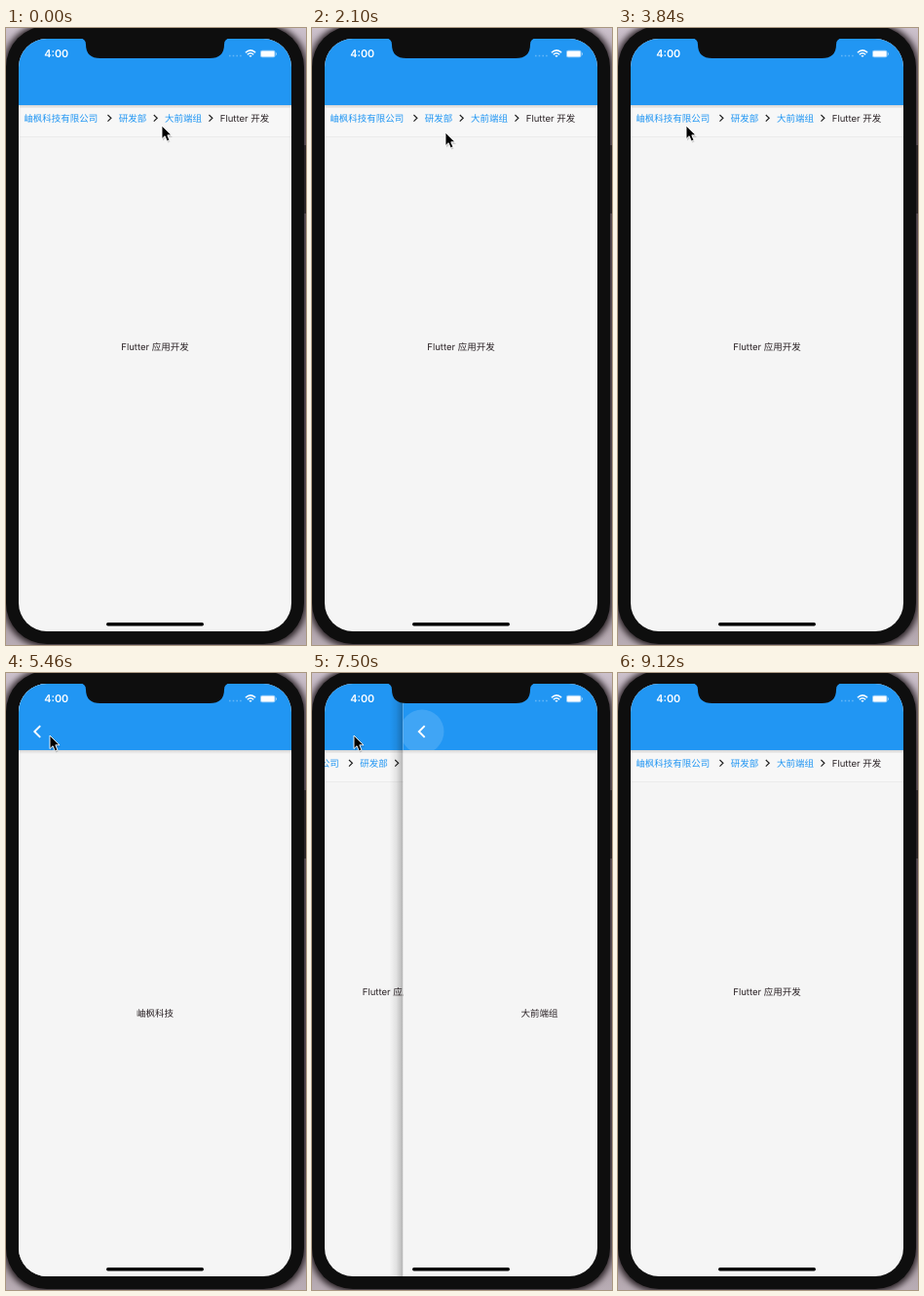
Write an HTML page that moves like this. It is 308 by 632 pixels and loops after 9.3 s.

```html
<!DOCTYPE html>
<html lang="zh-CN">
<head>
<meta charset="utf-8">
<title>Breadcrumb navigation</title>
<style>
  html, body { margin: 0; width: 308px; height: 632px; overflow: hidden; }
  svg { display: block; }
  text {
    font: 9.5px Inter, "Noto Sans CJK SC", "Noto Sans CJK", sans-serif;
    fill: #2a2225; text-rendering: geometricPrecision;
  }
  .link { fill: #2196f3; }
  .mid { text-anchor: middle; }
  .clock { font-size: 10.8px; font-weight: 600; fill: #fff; }
  .line { fill: none; stroke-linecap: square; }
  .halo { filter: blur(3px); }
</style>
</head>
<body>
<svg width="308" height="632" viewBox="0 0 308 632">
  <defs>
    <clipPath id="screen"><rect x="13" y="11" width="280" height="607" rx="29"/></clipPath>
    <clipPath id="bar"><rect x="13" y="11" width="280" height="68"/></clipPath>
    <linearGradient id="wall" x2="0" y2="1">
      <stop stop-color="#cdc2cd"/><stop offset=".12" stop-color="#93828c"/>
      <stop offset=".8" stop-color="#84747c"/><stop offset="1" stop-color="#b9adb5"/>
    </linearGradient>
    <linearGradient id="drop" x2="0" y2="1">
      <stop stop-color="#000" stop-opacity=".13"/><stop offset="1" stop-color="#000" stop-opacity="0"/>
    </linearGradient>
    <linearGradient id="edge">
      <stop stop-color="#000" stop-opacity="0"/><stop offset=".5" stop-color="#000" stop-opacity=".08"/>
      <stop offset="1" stop-color="#000" stop-opacity=".27"/>
    </linearGradient>
    <g id="sheet">
      <rect x="13" y="11" width="280" height="607" fill="#f5f5f5"/>
      <rect x="13" y="11" width="280" height="68" fill="#2196f3"/>
      <rect x="13" y="79" width="280" height="4" fill="url(#drop)"/>
    </g>
    <path id="next" class="line" d="M-1.6 -2.9L1.4 0L-1.6 2.9" stroke="#222" stroke-width="1.2"/>
  </defs>

  <rect width="308" height="632" fill="url(#wall)"/>
  <rect class="halo" x="-2" y="-4" width="310" height="638" rx="42" fill="#2a2226"/>
  <rect x="305" y="120" width="3" height="70" fill="#2a2427"/>
  <rect x="0" y="-2" width="306" height="633" rx="42" fill="#0e0e0e"/>

  <g clip-path="url(#screen)">
    <g id="home">
      <use href="#sheet"/>
      <rect x="13" y="82" width="280" height="29" fill="#f7f7f7"/>
      <path d="M13 111.500H293" stroke="#ebebeb"/>
      <text class="link" x="18.300" y="95.500">岫枫科技有限公司</text>
      <use href="#next" x="106.500" y="92.300"/>
      <text class="link" x="115.800" y="95.500">研发部</text>
      <use href="#next" x="153.800" y="92.300"/>
      <text class="link" x="163" y="95.500">大前端组</text>
      <use href="#next" x="210.500" y="92.300"/>
      <text x="219.800" y="95.500">Flutter 开发</text>
      <text class="mid" x="153" y="330">Flutter 应用开发</text>
    </g>
    <g id="page">
      <rect x="-1" y="11" width="14" height="607" fill="url(#edge)"/>
      <use href="#sheet"/>
      <g clip-path="url(#bar)"><circle id="ripple" cx="32.500" cy="60" fill="#fff"/></g>
      <path class="line" d="M34.500 54.800L29.300 60L34.500 65.200" stroke="#fff" stroke-width="1.900"/>
      <text id="label" class="mid" x="153" y="352"></text>
    </g>

    <text class="clock" x="39.300" y="30.300">4:00</text>
    <path d="M229 28.500H242" stroke="#fff" stroke-opacity=".3" stroke-width="1.300" stroke-dasharray="1.600 2.100"/>
    <g class="line" stroke="#fff" stroke-width="1.500" style="stroke-linecap: butt">
      <path d="M245.900 25.200Q251 20.600 256.100 25.200M247.800 27.200Q251 24.300 254.200 27.200"/>
      <path d="M249.300 28L251 30L252.700 28Z" fill="#fff" stroke="none"/>
    </g>
    <rect x="261" y="22.800" width="15.500" height="7.400" rx="2" fill="#fff" fill-opacity=".5"/>
    <rect x="262" y="23.800" width="13.500" height="5.400" rx="1.200" fill="#fff"/>
    <rect x="277" y="25.200" width="1" height="2.600" rx=".5" fill="#fff" fill-opacity=".5"/>
    <rect x="103" y="609" width="100" height="3.500" rx="1.700" fill="#000"/>
  </g>
  <path d="M76 10.500Q82 11 82 17Q82 31 97 31H209Q224 31 224 17Q224 11 230 10.500Z" fill="#0e0e0e"/>

  <g id="cursor">
    <path d="M1 2V15.500L4 12.800L6.200 17.500L8.500 16.500L6.500 12H11Z" fill="#000" opacity=".16"/>
    <path d="M0 0V13.600L3.100 10.700L5.300 15.900L7.900 14.800L5.800 9.800H10Z"
          fill="#000" stroke="#fff" stroke-width=".9" stroke-linejoin="round"/>
  </g>
</svg>

<script>
const LOOP = 9300, STEP = 60, SLIDE = 400, WIDTH = 280;

// push time, pop time, page text
const visits = [
  [340, 1460, '大前端组'],
  [2320, 3130, '研发部'],
  [4080, 5600, '岫枫科技'],
  [6520, 7456, '大前端组']
];

// time, x, y of the pointer tip
const path = [
  [0, 160, 100], [240, 180, 95], [420, 180, 95], [1200, 50, 73], [1320, 42, 63], [1560, 42, 63],
  [2100, 137, 107], [2220, 132, 96], [2400, 132, 96], [2880, 42, 64], [3300, 42, 64],
  [3840, 70, 100], [3960, 65, 95], [4160, 65, 95], [4800, 43, 80], [5100, 45, 64], [5700, 45, 64],
  [6300, 180, 95], [6600, 180, 95], [7140, 43, 64], [8160, 43, 64], [9060, 200, 640], [LOOP, 200, 640]
];

const [home, page, ripple, label, cursor] =
  ['home', 'page', 'ripple', 'label', 'cursor'].map(id => document.getElementById(id));
const clamp = v => Math.min(1, Math.max(0, v));
const mix = (a, b, k) => a + (b - a) * k;
const move = (el, x, y = 0) => el.setAttribute('transform', `translate(${x} ${y})`);

// cubic-bezier(.35, .91, .33, .97), solved by bisection
function ease(x) {
  if (x <= 0 || x >= 1) return clamp(x);
  const bez = (a, b, s) => 3 * (1 - s) ** 2 * s * a + 3 * (1 - s) * s * s * b + s ** 3;
  let lo = 0, hi = 1;
  for (let i = 0; i < 24; i++) {
    const s = (lo + hi) / 2;
    if (bez(.35, .33, s) < x) lo = s; else hi = s;
  }
  return bez(.91, .97, lo);
}

function drawPages(t) {
  const visit = visits.find(([push, pop]) => t >= push && t < pop + SLIDE);
  page.style.display = visit ? '' : 'none';
  if (!visit) return move(home, 0);
  const [push, pop, text] = visit;
  const away = t < pop ? 1 - ease((t - push) / SLIDE) : ease((t - pop) / SLIDE);
  move(page, away * WIDTH);
  move(home, (away - 1) * WIDTH / 3);
  label.textContent = text;
  const press = t - pop + 110;
  ripple.setAttribute('r', mix(8, 22.5, clamp(press / 150)));
  ripple.setAttribute('opacity', press < 0 ? 0 : .14 * clamp((420 - press) / 220));
}

function drawCursor(t) {
  const i = path.findIndex(p => p[0] > t);
  const [t0, x0, y0] = path[i - 1], [t1, x1, y1] = path[i];
  const k = (t - t0) / (t1 - t0), s = k * k * (3 - 2 * k);
  move(cursor, mix(x0, x1, s), mix(y0, y1, s));
}

function draw() {
  const now = performance.now() % LOOP;
  const t = Math.min(Math.floor(now / STEP) * STEP, LOOP - 3 * STEP);
  drawPages(t);
  drawCursor(t);
  requestAnimationFrame(draw);
}
draw();
</script>
</body>
</html>
```
